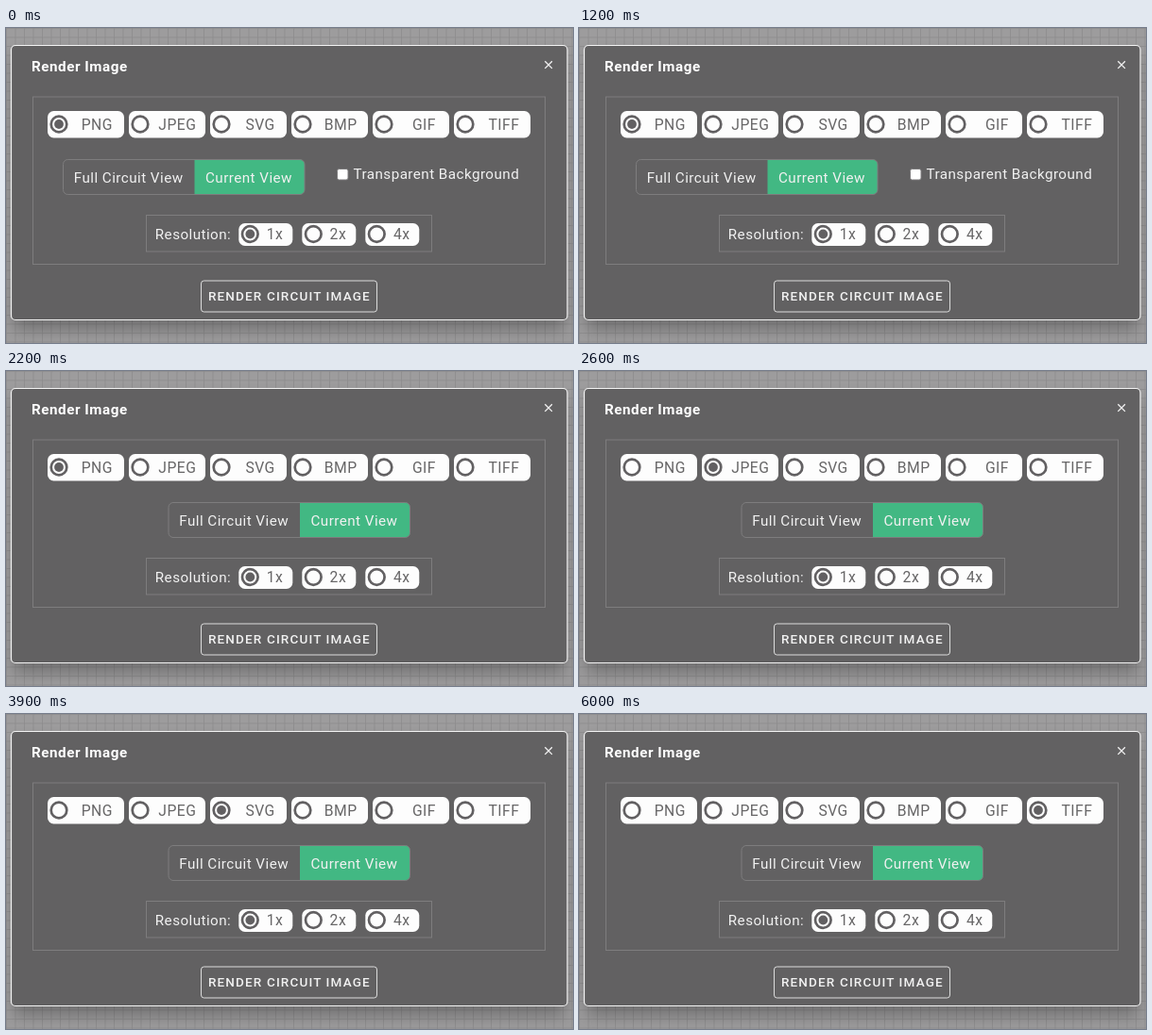
An HTML page for the animation above (6.9 s loop, 600 px wide and 334 px high).

```html
<!DOCTYPE html>
<html lang="en">
<head>
<meta charset="utf-8">
<title>Render Image</title>
<style>
  html, body { margin: 0; width: 100%; height: 100%; overflow: hidden; background: #9b9a9b; }
  svg { display: block; width: 100vw; height: 100vh; }
  text { font-family: Roboto, sans-serif; font-size: 15.2px; letter-spacing: .46px; fill: #f1f1f1; white-space: pre; }
  .title { font-weight: 700; letter-spacing: .55px; fill: #fff; }
  .label { font-size: 15.7px; letter-spacing: .5px; fill: #676667; }
  .action { font-size: 13.5px; font-weight: 500; letter-spacing: 1.15px; }
  .frame { fill: none; stroke: #7e7d7e; }
  .pill { fill: #fdfdfd; }
  .ring { fill: none; stroke: #626062; stroke-width: 2.7; }
  .dot { fill: #626062; }
</style>
</head>
<body>
<svg id="stage" viewBox="0 0 600 334">
  <defs>
    <pattern id="grid" width="9.5" height="9.5" patternUnits="userSpaceOnUse">
      <path d="M0 .5H9.5M.5 0V9.5" stroke="#8d8c8d" stroke-width=".8" fill="none"/>
    </pattern>
    <filter id="soft" x="-20%" y="-30%" width="140%" height="160%">
      <feGaussianBlur stdDeviation="9"/>
    </filter>
  </defs>
  <rect width="600" height="334" fill="#9d9c9d"/>
  <rect width="600" height="334" fill="url(#grid)"/>
  <rect x="8" y="30" width="584" height="290" fill="#000" opacity=".28" filter="url(#soft)"/>
  <rect x="5.5" y="18.5" width="588.5" height="291" rx="4.5" fill="#626162" stroke="#f4f4f4" stroke-width="1.2"/>
  <text class="title" x="27" y="46">Render Image</text>
  <path d="M570.3 35.3l7.6 7.6m0-7.6l-7.6 7.6" stroke="#f4f4f4" stroke-width="1.3"/>
  <rect class="frame" x="28.5" y="73" width="542" height="177.5"/>
  <g id="formats"></g>
  <g id="options">
    <g id="view">
      <path d="M199.5 139.5H311a5 5 0 0 1 5 5V171.500a5 5 0 0 1-5 5H199.500z" fill="#42b883"/>
      <rect class="frame" x="60.500" y="139.500" width="255.500" height="37" rx="5"/>
      <text x="71.800" y="164">Full Circuit View</text>
      <text x="211" y="164">Current View</text>
    </g>
    <g id="transparency">
      <rect x="350.500" y="149.500" width="11.500" height="11.500" rx="2" fill="#fff" stroke="#7c7b7c"/>
      <text x="367.500" y="160">Transparent Background</text>
    </g>
    <rect class="frame" x="148.500" y="198.500" width="302" height="38.500"/>
    <text x="157.800" y="223.500">Resolution:</text>
    <g id="sizes"></g>
  </g>
  <rect x="206.500" y="268" width="186" height="33" rx="3" fill="none" stroke="#dcdcdc"/>
  <text class="action" x="214" y="289">RENDER CIRCUIT IMAGE</text>
</svg>
<script>
  const LOOP = 6900, STEP = 100, FADE = 280, DOT = 4.9;
  const byId = id => document.getElementById(id);

  function add(parent, tag, attrs, text = '') {
    const el = document.createElementNS('http://www.w3.org/2000/svg', tag);
    for (const key in attrs) el.setAttribute(key, attrs[key]);
    el.textContent = text;
    parent.append(el);
    return el;
  }

  // Draws one radio pill and returns its dot.
  function radio(parent, x, y, width, height, cx, cy, label, labelX, baseline) {
    add(parent, 'rect', { class: 'pill', x, y, width, height, rx: 6.5 });
    add(parent, 'circle', { class: 'ring', cx, cy, r: 8.3 });
    add(parent, 'text', { class: 'label', x: labelX, y: baseline }, label);
    return add(parent, 'circle', { class: 'dot', cx, cy, r: 0 });
  }

  const formats = [
    ['PNG', 79.7], ['JPEG', 161.3], ['SVG', 253.4],
    ['BMP', 336.8], ['GIF', 429.9], ['TIFF', 510.4]
  ];
  const dots = formats.map(([name, labelX], i) => {
    const x = 44 + 86 * i;
    return radio(byId('formats'), x, 88, 81, 28.5, x + 12, 102, name, labelX, 107.5);
  });

  const sizeDots = [['1x', 275.8], ['2x', 342.6], ['4x', 410]].map(([name, labelX], i) => {
    const x = 246.3 + 67 * i;
    return radio(byId('sizes'), x, 207, 57, 24, x + 12, 218.5, name, labelX, 224);
  });
  sizeDots[0].setAttribute('r', DOT);

  // Moment at which each format gets picked.
  const picks = [-FADE, 2220, 3220, 3920, 4620, 5320, Infinity];
  const progress = (t, start) => Math.min(1, Math.max(0, (t - start) / FADE));

  function draw(time) {
    const t = Math.floor((time % LOOP) / STEP) * STEP;
    dots.forEach((dot, i) => {
      const grow = progress(t, picks[i]);
      const shrink = (1 - progress(t, picks[i + 1])) ** 3;
      dot.setAttribute('r', DOT * grow * shrink);
    });
    const isPng = t < 2200;
    const isSvg = t >= 3200 && t < 3900;
    byId('options').setAttribute('visibility', isSvg ? 'hidden' : 'visible');
    byId('transparency').setAttribute('display', isPng ? 'inline' : 'none');
    byId('view').setAttribute('transform', `translate(${isPng ? 0 : 111.5} 0)`);
  }

  const start = performance.now();
  function tick() {
    draw(performance.now() - start);
    requestAnimationFrame(tick);
  }
  tick();
</script>
</body>
</html>
```
